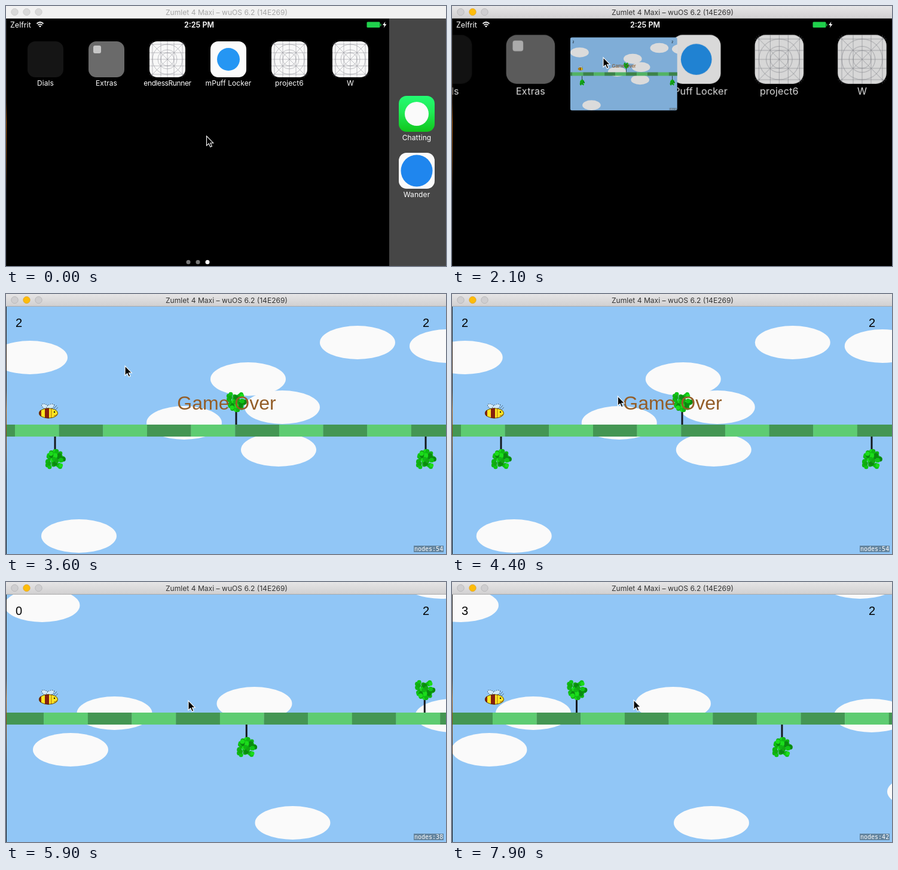
Recreate the animation shown at these times as an HTML page. Size 736 by 434 pixels, loop 8000 ms.

```html
<!DOCTYPE html>
<html lang="en">
<head>
<meta charset="utf-8">
<title>Bee runner</title>
<style>
  html, body { margin: 0; width: 100%; height: 100%; overflow: hidden; background: #000; }
  svg { display: block; width: 736px; height: 434px; }
  text { font-family: Inter, Roboto, sans-serif; }
  .label { font-size: 12px; fill: #fff; text-anchor: middle; letter-spacing: .1px; }
  .status { font-size: 12.5px; fill: #fff; }
  .game { font-family: "Liberation Sans", Arial, sans-serif; text-anchor: middle; }
  .nodes { font: 10px "DejaVu Sans Mono", monospace; fill: #fff; }
</style>
</head>
<body>
<svg id="stage" viewBox="0 0 736 434" xmlns="http://www.w3.org/2000/svg">
  <defs>
    <linearGradient id="bar" x1="0" y1="0" x2="0" y2="1">
      <stop offset="0" stop-color="#e6e5e6"/><stop offset="1" stop-color="#d0cfd0"/>
    </linearGradient>
    <linearGradient id="green" x1="0" y1="0" x2="0" y2="1">
      <stop offset="0" stop-color="#23fb72"/><stop offset=".45" stop-color="#20ea55"/><stop offset="1" stop-color="#10c61c"/>
    </linearGradient>
    <linearGradient id="edge" x1="0" y1="0" x2="0" y2="1">
      <stop offset="0" stop-color="#222"/><stop offset=".34" stop-color="#3a2410"/>
      <stop offset=".42" stop-color="#b0600f"/><stop offset=".58" stop-color="#6a3c10"/>
      <stop offset=".7" stop-color="#1c1c20"/><stop offset="1" stop-color="#111"/>
    </linearGradient>
    <clipPath id="appClip"><rect id="appClipRect" y="21" width="736" height="413"/></clipPath>
    <clipPath id="bodyClip"><ellipse rx="16" ry="8.5"/></clipPath>
  </defs>
</svg>
<script>
const LOOP = 8000, CLICK = 1900, LAUNCH = 1962, LAUNCH_TIME = 520, RESTART = 4500;
const TILE = 73.65, GROUND = 228, DRIFT = 0.031;

const stage = document.getElementById('stage');
const clipRect = document.getElementById('appClipRect');

function add(parent, tag, attrs = {}, text) {
  const el = document.createElementNS('http://www.w3.org/2000/svg', tag);
  set(el, attrs);
  if (text !== undefined) el.textContent = text;
  parent.append(el);
  return el;
}
function set(el, attrs) {
  for (const k in attrs) el.setAttribute(k, attrs[k]);
}
const group = (parent, x = 0, y = 0) => add(parent, 'g', { transform: `translate(${x} ${y})` });
const move = (el, x, y = 0, rest = '') => el.setAttribute('transform', `translate(${x} ${y}) ${rest}`);
const show = (el, on) => el.setAttribute('visibility', on ? 'visible' : 'hidden');
const rect = (parent, x, y, width, height, fill, rx = 0) =>
  add(parent, 'rect', { x, y, width, height, fill, rx });
const circle = (parent, cx, cy, r, fill) => add(parent, 'circle', { cx, cy, r, fill });

// Linear track through [time, value...] rows, extended past both ends.
function track(rows, t, col = 1) {
  let i = 1;
  while (i < rows.length - 1 && t > rows[i][0]) i++;
  const a = rows[i - 1], b = rows[i];
  return a[col] + (b[col] - a[col]) * (t - a[0]) / (b[0] - a[0]);
}
const smooth = u => u * u * (3 - 2 * u);
const clamp = u => Math.max(0, Math.min(1, u));

function random(seed) {
  return () => (seed = (seed * 16807) % 2147483647) / 2147483647;
}

// ---- home screen ----
rect(stage, 0, 0, 736, 434, '#000');
const home = add(stage, 'g');

function icon(x, y, name, fill) {
  const g = group(home, x, y);
  rect(g, -30, -30, 60, 60, fill, 13);
  add(g, 'text', { class: 'label', y: 43.5 }, name);
  return g;
}
function gridIcon(x, name) {
  const g = icon(x, 89, name, '#f8f8f8');
  const lines = add(g, 'g', { fill: 'none', stroke: '#85868e', 'stroke-width': .5 });
  let d = 'M-28-28L28 28M-28 28L28-28';
  for (const p of [-25, -11, 0, 11, 25]) d += `M${p}-30V30M-30 ${p}H30`;
  add(lines, 'path', { d, 'vector-effect': 'non-scaling-stroke' });
  for (const r of [25, 16, 11]) add(lines, 'circle', { r, 'vector-effect': 'non-scaling-stroke' });
  return g;
}

rect(home, 641, 21, 95, 413, '#464646');
icon(66, 89, 'Dials', '#151515');
const folder = icon(168, 89, 'Extras', '#6a6a6a');
rect(folder, -22, -23, 13, 13, '#c6c6c6', 3);
const runner = gridIcon(270, 'endlessRunner');
runner.querySelector('text').style.letterSpacing = '-.4px';
circle(icon(372, 89, 'mPuff Locker', '#fbfbfb'), 0, 0, 19, '#2596f3');
gridIcon(474, 'project6');
gridIcon(576, 'W');
circle(icon(687, 180, 'Chatting', 'url(#green)'), 0, 0, 20, '#fafafa');
circle(icon(687, 275, 'Wander', '#fafafa'), 0, 0, 26.5, '#1f86ee');
[305, 321, 337].forEach((x, i) => circle(home, x, 427.5, 3.5, i < 2 ? '#777' : '#fff'));

// ---- status bar ----
const status = add(stage, 'g');
add(status, 'text', { class: 'status', x: 7, y: 36 }, 'Zelfrit');
add(status, 'path', {
  d: 'M51.5 29.5Q57 24.5 62.5 29.5M53.5 31.8Q57 28.8 60.5 31.8',
  fill: 'none', stroke: '#fff', 'stroke-width': 1.7
});
add(status, 'path', { d: 'M55 33.5Q57 32 59 33.5L57 35.8Z', fill: '#fff' });
add(status, 'text', { class: 'status', x: 323, y: 36, 'text-anchor': 'middle', 'font-weight': 600 }, '2:25 PM');
rect(status, 603.5, 26.5, 22, 9.5, '#20d04c', 1.5);
rect(status, 626.3, 29.5, 1.3, 4, '#20d04c', .6);
add(status, 'path', { d: 'M634.5 26L630 32H633L631.8 36.5L636.5 30.2H633.5Z', fill: '#fff' });

// ---- game ----
const app = add(stage, 'g', { 'clip-path': 'url(#appClip)' });
rect(app, 0, 21, 736, 413, '#91c6f6');

function cloudLayer(points) {
  const g = group(app);
  for (const [cx, cy] of points) add(g, 'ellipse', { cx, cy, rx: 63, ry: 28, fill: '#fafafa' });
  return g;
}
const oldClouds = cloudLayer([[40, 106], [588, 81], [738, 87], [405, 142], [462, 189], [298, 215], [456, 260], [122, 404]]);
const newClouds = cloudLayer([[60.5, 39], [181.5, 219], [415.5, 203], [108, 280], [479.5, 402], [747.5, 223], [728, 0], [836.5, 350]]);

function tree(parent, x, up) {
  const g = add(parent, 'g', { transform: `translate(${x} ${GROUND}) scale(1 ${up ? 1 : -1})` });
  rect(g, -1.5, -34, 3, 24, '#15181c');
  const rnd = random(77);
  const greens = ['#0fc414', '#12a812', '#0b8a10', '#1bdc1b', '#10b514'];
  for (let i = 0; i < 56; i++) {
    const v = rnd();
    const half = v < .55 ? 13.5 : 13.5 - (v - .55) * 15;
    circle(g, (rnd() * 2 - 1) * half + .8, -61 + v * 27, 3 + rnd(), greens[i % 5]);
  }
}
const oldTrees = group(app), newTrees = group(app);
const course = [[403, 0], [701, 1], [1056.5, 1], [1394.5, 0], [1677.5, 1], [2021, 0]];
[[82, 0], [385, 1], [702, 0]].forEach(([x, up]) => tree(oldTrees, x, up));
course.forEach(([x, up]) => tree(newTrees, x, up));

const ground = group(app);
for (let i = 0; i < 14; i++)
  rect(ground, i * TILE, 218, TILE + .2, 20, i % 2 ? '#5ecc72' : '#449653');

const bee = add(app, 'g');
for (const [x, tilt] of [[-5, 28], [3, -24]]) {
  add(bee, 'ellipse', {
    cx: x, cy: -11, rx: 7, ry: 3.6, transform: `rotate(${tilt} ${x} -11)`,
    fill: '#cfe9fb', stroke: '#15202c', 'stroke-width': 1, 'stroke-dasharray': '1 2'
  });
}
add(bee, 'path', { d: 'M9-8L14-13M12-6L16-10', stroke: '#222', 'stroke-width': .8, 'stroke-dasharray': '2 1' });
const body = add(bee, 'g', { 'clip-path': 'url(#bodyClip)' });
rect(body, -16, -9, 32, 18, '#fbe621');
rect(body, -16, -9, 4, 18, '#8a2412');
rect(body, -6, -9, 7, 18, '#86200f');
rect(body, 4, -9, 1.5, 18, '#c98d12');
add(bee, 'ellipse', { rx: 15.6, ry: 8.2, fill: 'none', stroke: '#3a2208', 'stroke-width': .8 });
circle(bee, 10, -2, 1.2, '#111');
add(bee, 'path', { d: 'M9 4Q12 5 14 2', fill: 'none', stroke: '#7a2010', 'stroke-width': .8 });

const gameOver = add(app, 'text', { class: 'game', x: 369, y: 192.5, 'font-size': 32, fill: '#935d27' }, 'Game Over');
const score = add(app, 'text', { class: 'game', x: 21.5, y: 55, 'font-size': 20 });
add(app, 'text', { class: 'game', x: 702.5, y: 55, 'font-size': 20 }, '2');
rect(app, 682, 420, 50, 11, '#64859f');
const nodes = add(app, 'text', { class: 'nodes', x: 683, y: 429 });
const shade = rect(app, 0, 21, 736, 413, '#000');

// ---- window frame ----
rect(stage, 0, 21, 1, 413, 'url(#edge)');
const bar = rect(stage, 0, 0, 736, 21);
const barLine = rect(stage, 0, 20, 736, 1);
const lights = [14.5, 34.5, 54.5].map(x =>
  add(stage, 'circle', { cx: x, cy: 10, r: 5.7, 'stroke-width': .8 }));
const title = add(stage, 'text', { x: 369, y: 15, 'font-size': 12.1, 'text-anchor': 'middle' },
  'Zumlet 4 Maxi – wuOS 6.2 (14E269)');

const cursor = add(stage, 'path', {
  d: 'M0 0V16L3.7 12.7L6.3 18.3L8.9 17.2L6.5 11.7H11.3Z',
  fill: '#000', stroke: '#fff', 'stroke-width': 1.1
});

const pointer = [
  [0, 335.5, 217], [1000, 335.5, 219], [1250, 330, 210], [1750, 258, 90], [2100, 253, 86],
  [2500, 250, 88], [3300, 201, 118], [3600, 199, 120], [4100, 230, 140], [4800, 340, 211],
  [5000, 342, 213], [5600, 308, 200], [5900, 305, 198], [6900, 304, 197], [8000, 304, 197]
];
const distance = [[5000, -646], [5900, 0], [6900, 735.6], [7900, 1468.3]];

function drawWindow(active) {
  set(bar, { fill: active ? 'url(#bar)' : '#f1f1f1' });
  set(barLine, { fill: active ? '#aaa' : '#d4d4d4' });
  set(title, { fill: active ? '#333' : '#a6a6a6' });
  lights.forEach((dot, i) => set(dot, active && i === 1
    ? { fill: '#fdbc0a', stroke: '#dfa023' }
    : { fill: active ? '#cfced0' : '#d9d9d9', stroke: active ? '#b2b1b3' : '#c6c6c6' }));
}

function drawLaunch(t) {
  const p = smooth(clamp((t - LAUNCH) / LAUNCH_TIME));
  const on = t >= LAUNCH;
  move(home, 270, 89, `scale(${1 + 2.04 * p}) translate(-270 -89)`);
  set(home, { opacity: 1 - .75 * p });
  set(runner, { opacity: t < CLICK ? 1 : on ? 0 : .6 });
  show(home, p < 1);
  show(status, p < 1);
  const w = 60 + 676 * p, h = 60 + 353 * p;
  const cx = 270 + 98 * p, cy = 89 + 138.5 * p;
  move(app, cx - w / 2, cy - h / 2, `scale(${w / 736} ${h / 413}) translate(0 -21)`);
  set(app, { display: on ? 'inline' : 'none' });
  set(shade, { opacity: .15 * (1 - p) });
  set(clipRect, { rx: 18 * (1 - p), ry: 14 * (1 - p) });
}

function drawGame(t) {
  const playing = t >= RESTART;
  for (const el of [oldClouds, oldTrees, gameOver]) show(el, !playing);
  for (const el of [newClouds, newTrees]) show(el, playing);
  if (!playing) {
    move(oldClouds, (3600 - Math.max(t, 2520)) * .0228);
    move(ground, 15 - TILE);
    move(bee, 71, 199);
    score.textContent = 2;
    nodes.textContent = 'nodes:54';
    return;
  }
  const s = track(distance, t), span = 2 * TILE;
  move(newClouds, -s * DRIFT);
  move(newTrees, -s);
  move(ground, ((64 - TILE - s) % span + span) % span - span);
  const below = t >= 6580 && t < 7450;
  move(bee, 71, below ? 259 : 196, `scale(1 ${below ? -1 : 1})`);
  score.textContent = course.filter(([x]) => x - s < -120).length;
  nodes.textContent = 'nodes:' + (36 + course.filter(([x]) => x - s < 780).length);
}

function frame() {
  const t = performance.now() % LOOP;
  drawWindow(t >= CLICK);
  drawLaunch(t);
  drawGame(t);
  move(cursor, track(pointer, t), track(pointer, t, 2));
  requestAnimationFrame(frame);
}
frame();
</script>
</body>
</html>
```
